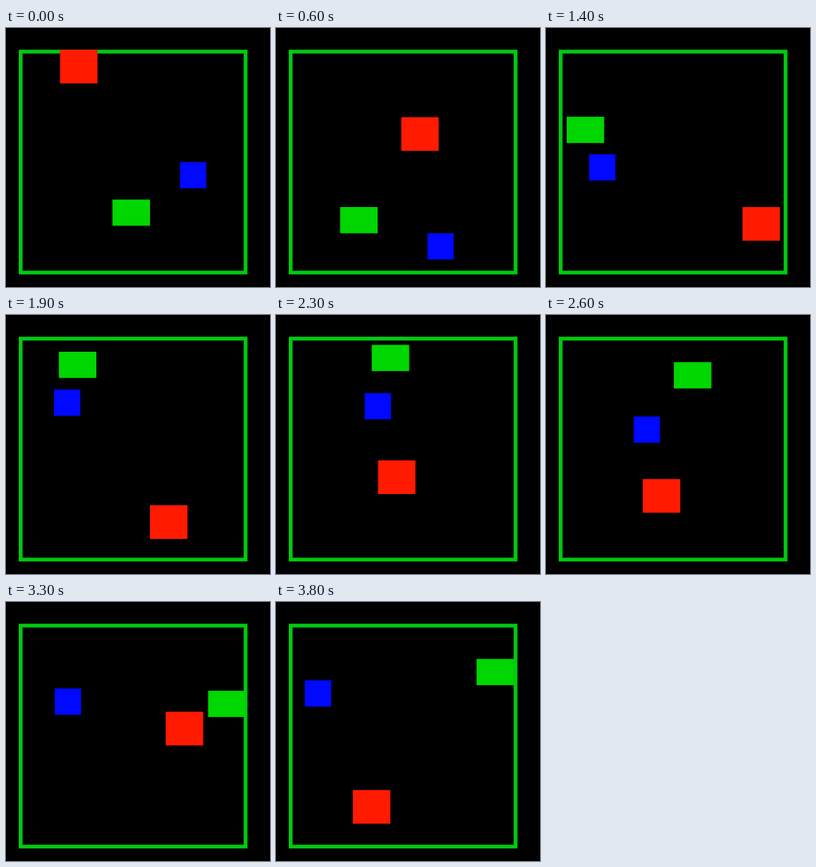
An HTML page that plays this animation: 330 px wide and 324 px high, repeating every 3900 ms.

```html
<!DOCTYPE html>
<html lang="en">
<head>
<meta charset="utf-8">
<title>Bouncing boxes</title>
<style>
  html, body { margin: 0; width: 100%; height: 100%; overflow: hidden; background: #000; }
  svg { display: block; width: 330px; height: 324px; }
</style>
</head>
<body>
<svg viewBox="0 0 330 324">
  <g transform="translate(16 27.2) scale(4.685)">
    <rect x=".5" y=".5" width="60" height="59" fill="none" stroke="#00ca10"/>
    <rect id="green" width="10" height="7" fill="#00d600"/>
    <rect id="blue" width="7" height="7" fill="#0008ff"/>
    <rect id="red" width="10" height="9" fill="#ff1a00"/>
  </g>
</svg>
<script>
const LOOP = 3900, TICK = 100;

// Each box flies straight from one turn [tick, x, y] to the next.
// Positions run on past the walls and are folded back inside, which makes the bounces.
const boxes = [
  { id: 'red', wall: [51, 51], turns: [
    [0, 11, 0], [6, 30, 18], [14, 53, 42], [19, 67, 57],
    [24.5, 82.4, 73.5], [26, 79.6, 64], [33, 62.8, 23.5], [38, 84.9, 44.4]] },
  { id: 'green', wall: [51, 50], turns: [
    [0, 25, 40], [6, -13.7 + 27.4, 58], [14, -2.1, 82.1], [19, -10.7, 96],
    [26, -30.7, 106.8], [33, -50.5, 117.9], [38, -51.9, 109.4]] },
  { id: 'blue', wall: [54, 53], turns: [
    [0, 43, 30], [6, 71, 49], [14, 99.9, 78.1], [19, 117.4, 91.9], [21.5, 126, 98.9],
    [24.5, 130.5, 83], [26, 128, 84.7], [33, 117.6, 88.7], [38, 112.3, 90.9]] }
];

for (const box of boxes) box.el = document.getElementById(box.id);

function fold(v, wall) {
  const span = 2 * wall;
  return wall - Math.abs(wall - (v % span + span) % span);
}

function place({ el, wall, turns }, tick) {
  const i = Math.max(1, turns.findIndex(turn => turn[0] >= tick));
  const from = turns[i - 1], to = turns[i];
  const k = (tick - from[0]) / (to[0] - from[0]);
  ['x', 'y'].forEach((axis, n) => {
    const v = from[n + 1] + (to[n + 1] - from[n + 1]) * k;
    el.setAttribute(axis, fold(v, wall[n]));
  });
}

const start = performance.now();

function draw() {
  const tick = Math.floor((performance.now() - start) % LOOP / TICK);
  for (const box of boxes) place(box, tick);
  requestAnimationFrame(draw);
}
draw();
</script>
</body>
</html>
```
